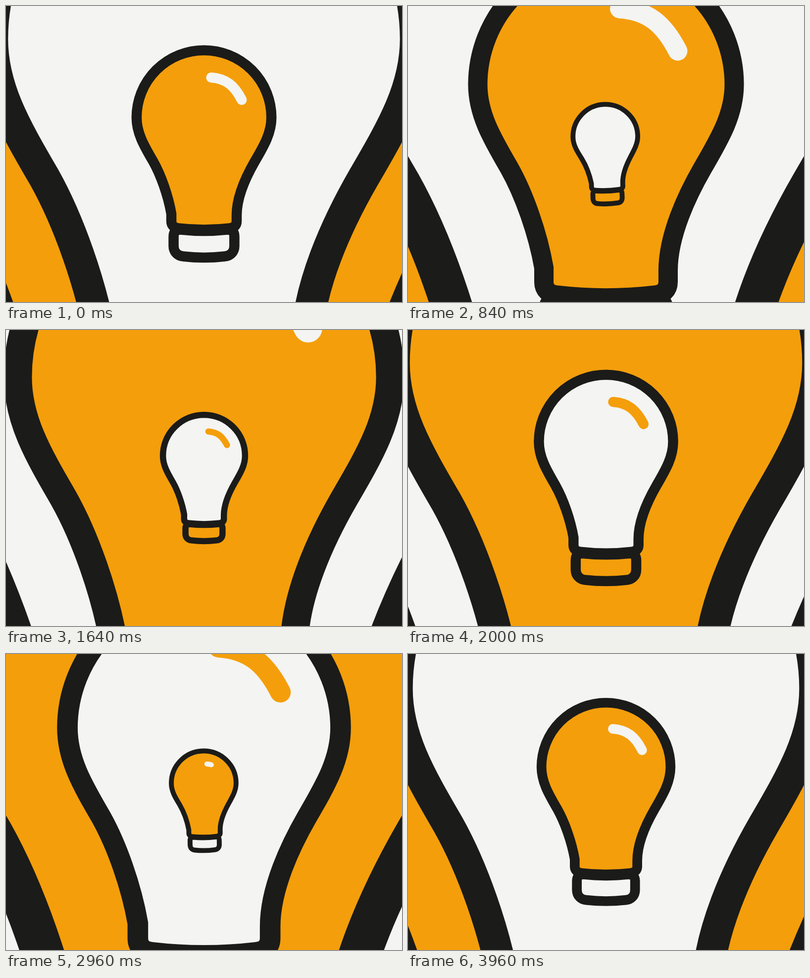
An HTML page with a canvas that plays this animation: 800 by 600 pixels, repeating every 4000 ms.

```html
<!DOCTYPE html>
<html lang="en">
<head>
<meta charset="utf-8">
<title>Endless light bulbs</title>
<style>
  html, body { margin: 0; width: 100%; height: 100%; overflow: hidden; background: #f4f4f2; }
  canvas { display: block; width: 100vw; height: 100vh; }
</style>
</head>
<body>
<canvas id="stage" width="800" height="600"></canvas>
<script>
const ctx = document.getElementById('stage').getContext('2d');

const INK = '#1b1b19';
const COLORS = ['#f49e0b', '#f4f4f2'];
const STEP = 2000;        // time between two bulbs
const GROWTH = 0.0010765; // scale gained per ms
const REST = 0.4815;      // scale a new bulb waits at
const ENTER = 400;

// Bulb drawn around its own centre
const glass = new Path2D(`M-135.85 -73.9 A135.85 135.85 0 0 1 135.85 -73.9
  C135.85 -43 121.6 -18 102.4 15
  C86.3 43 65.8 86 65.8 124 L65.8 136
  C65.8 144 61 149 52 150 Q0 156.1 -52 150
  C-61 149 -65.8 144 -65.8 136 L-65.8 121
  C-72.3 83.6 -87 42.5 -102.4 15
  C-121.6 -18 -135.85 -43 -135.85 -73.9 Z`);
const socket = new Path2D(`M-61.3 167 C-61.3 158 -57 153 -48 153
  Q0 158.2 48 153 C57 153 61.2 158 61.2 167 L61.2 186
  C61.2 198 53 206 42 207 Q0 212 -42 207
  C-53 206 -61.3 198 -61.3 186 Z`);
const shine = new Path2D('M14.5 -154.5 C44 -152.5 61 -139 76 -109.5');

const progress = (t, from, to) => Math.min(1, Math.max(0, (t - from) / (to - from)));
const easeOutBack = (p, c) => 1 + (c + 1) * (p - 1) ** 3 + c * (p - 1) ** 2;

// Pose of a bulb; age 0 is the moment it reaches full size
function pose(age, odd) {
  const zoom = 1 + age * GROWTH + (odd ? -0.003 : 0.0015);
  if (age >= 0) return { scale: zoom, y: 300, turn: 0, lit: 1, gloss: 1 };
  const t = age + STEP;
  const pop = REST * easeOutBack(progress(t, ENTER, 840), 1.154);
  return {
    scale: Math.max(pop, zoom),
    y: 297.5 + 160 * (1 - progress(t, ENTER, 960)) ** 2.6 + 2.5 * progress(t, 1400, 1600),
    turn: -10.1 * (1 - progress(t, ENTER, 1208)) ** 2,
    lit: progress(t, 700, 800),
    gloss: progress(t, 900, 1160)
  };
}

function drawBulb(age, odd) {
  const { scale, y, turn, lit, gloss } = pose(age, odd);
  if (scale <= 0) return;
  ctx.save();
  ctx.translate(400, y);
  ctx.rotate(turn * Math.PI / 180);
  ctx.scale(scale, scale);
  ctx.lineWidth = 20.5;
  ctx.lineJoin = ctx.lineCap = 'round';

  ctx.globalAlpha = lit;
  ctx.fillStyle = COLORS[odd];
  ctx.fill(glass);
  ctx.globalAlpha = 1;

  ctx.strokeStyle = INK;
  ctx.stroke(socket);
  ctx.stroke(glass);

  if (gloss > 0) {
    ctx.strokeStyle = COLORS[1 - odd];
    if (gloss < 1) ctx.setLineDash([82 * gloss, 200]);
    ctx.stroke(shine);
  }
  ctx.restore();
}

function render(t) {
  const current = Math.floor(t / STEP);
  ctx.fillStyle = COLORS[0];
  ctx.fillRect(0, 0, 800, 600);
  for (let k = current - 3; k <= current + 1; k++) {
    const age = t - k * STEP;
    if (age > ENTER - STEP) drawBulb(age, Math.abs(k % 2));
  }
}

const start = performance.now();
function tick() {
  render((performance.now() - start) % (2 * STEP));
  requestAnimationFrame(tick);
}
render(0);
requestAnimationFrame(tick);
</script>
</body>
</html>
```
